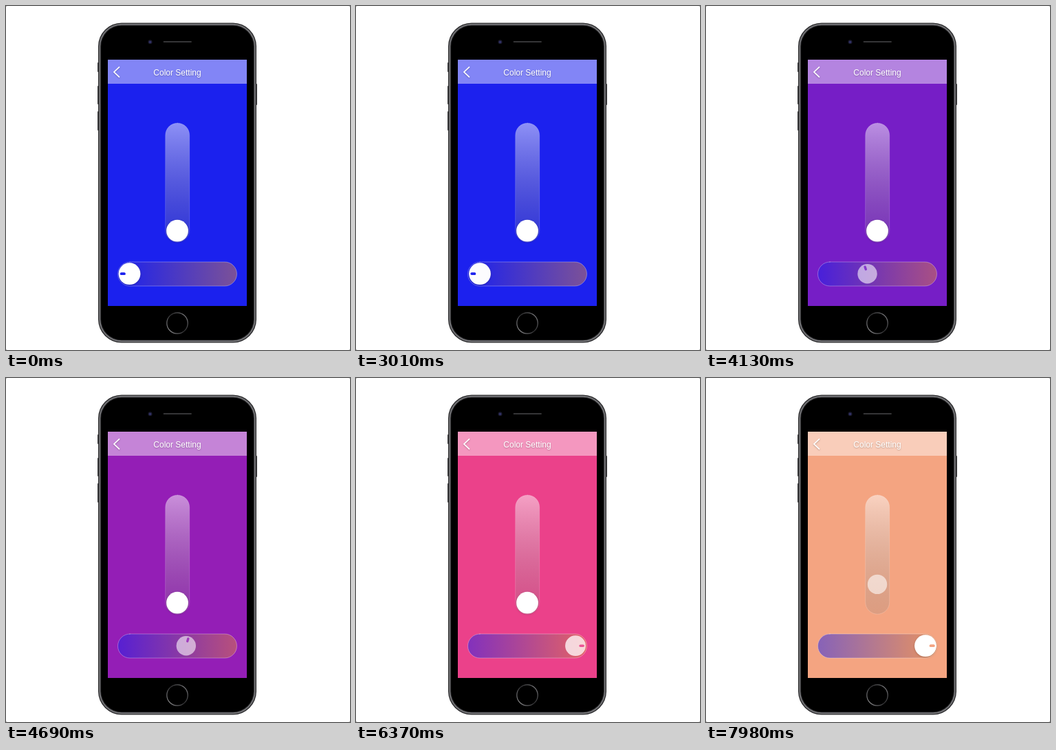
An HTML page with a canvas that plays this animation: 500 by 500 pixels, repeating every 8 s.

```html
<!DOCTYPE html>
<html lang="en">
<head>
<meta charset="utf-8">
<title>Color Setting</title>
<style>
  html, body { margin: 0; width: 100%; height: 100%; overflow: hidden; background: #fff; }
  canvas { display: block; width: 500px; height: 500px; }
</style>
</head>
<body>
<canvas id="stage" width="500" height="500"></canvas>
<script>
const ctx = document.getElementById('stage').getContext('2d');
const LOOP = 8000, STEP = 70, SPEED = 0.0487;

// Background colour over time: [ms, r, g, b]
const TINTS = [
  [3000, 27, 33, 238],
  [3570, 88, 30, 213],
  [4690, 148, 30, 182],
  [5740, 200, 34, 170],
  [6370, 235, 65, 138],
  [7980, 244, 164, 129]
];

const clamp = (v, a, b) => Math.min(b, Math.max(a, v));
const mix = (a, b, k) => a + (b - a) * k;
const ease = (t, from, to) => {
  const k = clamp((t - from) / (to - from), 0, 1);
  return k * k * (3 - 2 * k);
};
const white = a => `rgba(255,255,255,${a})`;

function tint(t) {
  let i = 0;
  while (i < TINTS.length - 2 && t > TINTS[i + 1][0]) i++;
  const a = TINTS[i], b = TINTS[i + 1];
  const k = clamp((t - a[0]) / (b[0] - a[0]), 0, 1);
  return `rgb(${[1, 2, 3].map(c => Math.round(mix(a[c], b[c], k))).join(',')})`;
}

function box(x, y, w, h, r, fill, stroke, width = 1) {
  ctx.beginPath();
  ctx.roundRect(x, y, w, h, r);
  if (fill) { ctx.fillStyle = fill; ctx.fill(); }
  if (stroke) { ctx.strokeStyle = stroke; ctx.lineWidth = width; ctx.stroke(); }
}

function disc(x, y, r, fill) {
  ctx.beginPath();
  ctx.arc(x, y, r, 0, Math.PI * 2);
  ctx.fillStyle = fill;
  ctx.fill();
}

function line(points, color, width) {
  ctx.beginPath();
  points.forEach(([x, y]) => ctx.lineTo(x, y));
  ctx.strokeStyle = color;
  ctx.lineWidth = width;
  ctx.stroke();
}

function ramp(x0, y0, x1, y1, ...colors) {
  const g = ctx.createLinearGradient(x0, y0, x1, y1);
  colors.forEach((c, i) => g.addColorStop(i / (colors.length - 1), c));
  return g;
}

function shadow(alpha, blur, dy) {
  ctx.shadowColor = `rgba(0,0,0,${alpha})`;
  ctx.shadowBlur = blur;
  ctx.shadowOffsetY = dy;
}

function drawPhone() {
  box(0, 0, 500, 500, 0, '#999');
  box(0, 0, 500, 500, 2, '#fff');

  // side buttons
  [[82, 14], [116, 27], [153, 28]].forEach(([y, h]) => box(133, y, 3, h, 1, '#3c3c3e'));
  box(362, 113, 3, 31, 1, '#3c3c3e');

  box(134, 24.5, 230, 465, 34, '#2c2c2e');
  box(135.3, 25.8, 227.4, 462.4, 33, '#77777a');
  box(137.2, 27.7, 223.6, 458.6, 31, '#2a2a2c');
  box(138.2, 28.7, 221.6, 456.6, 30, '#000');

  disc(209.5, 52.3, 3, '#1b1b30');
  disc(209.5, 52.3, 1.6, '#34346c');
  ctx.lineCap = 'round';
  line([[229.5, 52], [269, 52]], '#353537', 1.8);

  ctx.beginPath();
  ctx.arc(249, 461, 15.2, 0, Math.PI * 2);
  ctx.strokeStyle = ramp(236, 472, 262, 450, '#8a8a8c', '#2c2c2e', '#77777a');
  ctx.lineWidth = 1.2;
  ctx.stroke();
}

function drawHeader() {
  box(148, 78, 202, 35, 0, white(0.45));
  ctx.save();
  shadow(0.25, 2, 1);
  ctx.lineCap = 'butt';
  ctx.lineJoin = 'miter';
  line([[165, 88.3], [157, 96], [165, 103.7]], '#fff', 1.7);
  ctx.font = '12px "Liberation Sans", Arial, sans-serif';
  ctx.textAlign = 'center';
  ctx.textBaseline = 'alphabetic';
  ctx.fillStyle = '#fff';
  ctx.fillText('Color Setting', 249, 101);
  ctx.restore();
}

function knob(x, y, press) {
  ctx.save();
  if (press < 0.5) shadow(0.22, 3, 1);
  disc(x, y, mix(15.9, 14.2, press), white(mix(1, 0.58, press)));
  ctx.restore();
}

function drawSliders(t, color) {
  const rise = clamp((t - 7430) * SPEED, 0, 140);
  const vPress = ease(t, 7360, 7560);
  box(231.7, 170.2, 35, 173, 17.5,
    ramp(0, 170, 0, 343, white(0.5), 'rgba(128,128,128,0.2)'), white(0.2), 0.9);
  knob(249, 326.7 - rise, vPress);

  const k = clamp((t - 3000) * SPEED / 139.5, 0, 1);
  const press = ease(t, 2990, 3200) * (1 - ease(t, 6200, 6580));
  box(162.5, 372, 173, 35, 17.5,
    ramp(163, 0, 336, 0, 'rgba(27,33,238,0.5)', 'rgba(220,130,65,0.5)'), white(0.35), 0.9);
  const x = 179.5 + 139.5 * k;
  knob(x, 389.2, press);

  // marker turns over the top as the knob travels
  ctx.save();
  ctx.translate(x, 389.2);
  ctx.rotate(Math.PI * (1 + k));
  const s = mix(1, 0.9, press);
  ctx.scale(s, s);
  ctx.globalAlpha = mix(1, 0.8, press);
  box(5.7, -1.9, 8, 3.8, 1.9, color);
  ctx.restore();
}

function render(ms) {
  const t = Math.floor((ms % LOOP) / STEP) * STEP;
  const color = tint(t);
  drawPhone();
  box(148, 78, 202, 358, 0, color);
  drawHeader();
  drawSliders(t, color);
}

const start = performance.now();
function tick() {
  render(performance.now() - start);
  requestAnimationFrame(tick);
}
tick();
</script>
</body>
</html>
```
